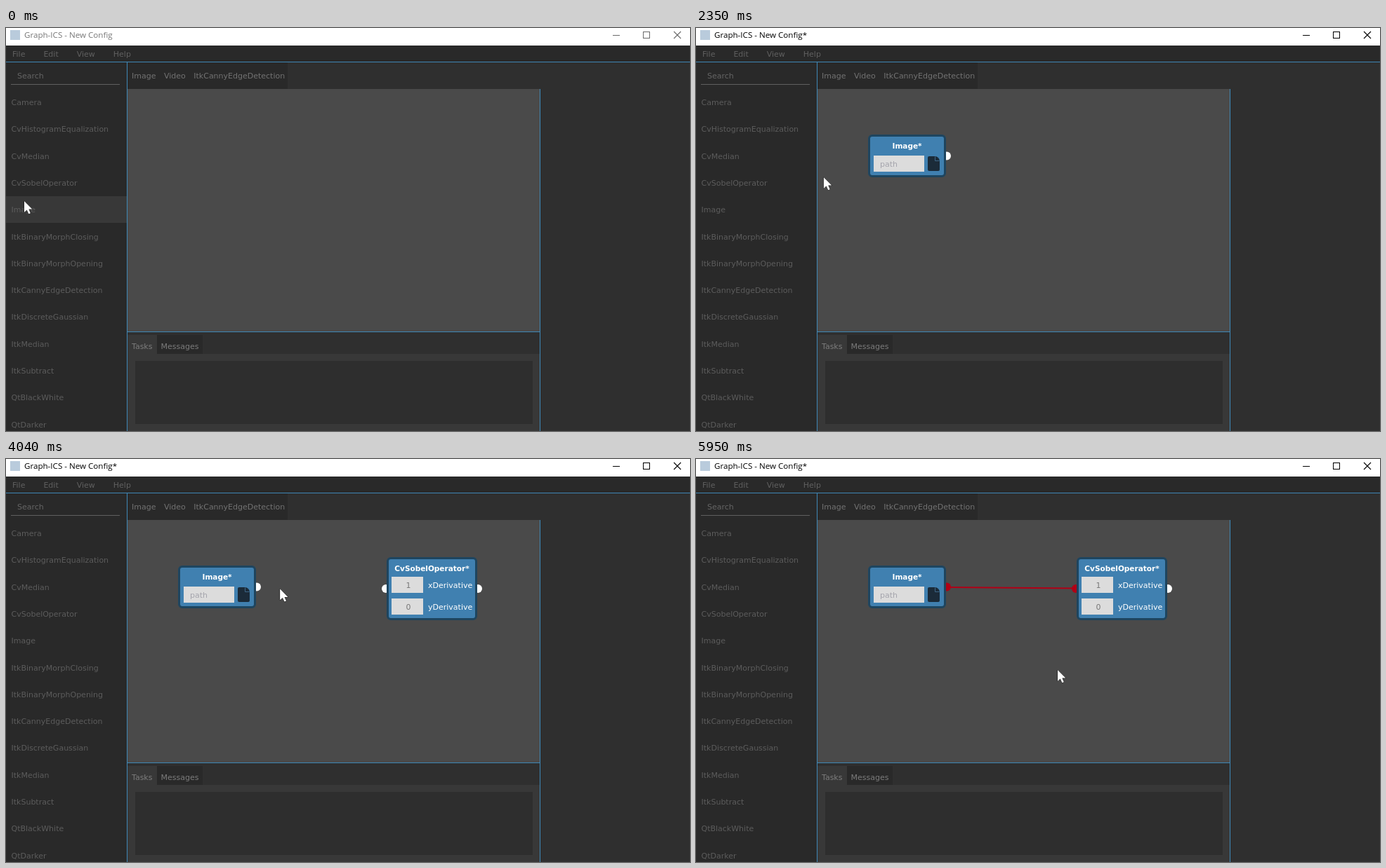
These frames come from a looping animation (974 px wide and 575 px high, 6.71 s). An HTML page with a canvas:

```html
<!DOCTYPE html>
<html lang="en">
<head>
<meta charset="utf-8">
<title>Node editor</title>
<style>
html, body { margin: 0; width: 974px; height: 575px; overflow: hidden; background: #2f2f2f; }
canvas { display: block; }
</style>
</head>
<body>
<canvas id="stage" width="974" height="575"></canvas>
<script>
const ctx = document.getElementById('stage').getContext('2d');
const LOOP = 6710, BLUE = '#3e87b6', RED = '#b00016';
const UI = '11px "DejaVu Sans", Verdana, sans-serif';
const BOLD = 'bold 10.5px "DejaVu Sans", Verdana, sans-serif';
const TITLE = '11.6px "Open Sans", "Noto Sans", sans-serif';
const FILTERS = ['Camera', 'CvHistogramEqualization', 'CvMedian', 'CvSobelOperator', 'Image',
  'ItkBinaryMorphClosing', 'ItkBinaryMorphOpening', 'ItkCannyEdgeDetection',
  'ItkDiscreteGaussian', 'ItkMedian', 'ItkSubtract', 'QtBlackWhite', 'QtDarker'];
const IMAGE_ROW = FILTERS.indexOf('Image'), SOBEL_ROW = FILTERS.indexOf('CvSobelOperator');

// Moments at which the user presses and releases the mouse
const IMAGE_DRAG = { from: 660, to: 1790 };
const SOBEL_DRAG = { from: 2690, to: 3510 };
const WIRE_DRAG = { from: 4480, to: 5250 };
const SNAP = 5130, NODE_LAG = 40;

// Pointer moves, each easing out; bow bends the way downwards
const START = { x: 26, y: 247 };
const MOVES = [
  { from: 50, to: 710, x: 161, y: 262, bow: 14 },
  { from: 840, to: 1530, x: 300, y: 183, bow: 0 },
  { from: 1970, to: 2630, x: 150, y: 221, bow: 0 },
  { from: 2730, to: 3390, x: 606, y: 185, bow: 12 },
  { from: 3510, to: 4300, x: 358, y: 184, bow: 3 },
  { from: 4500, to: SNAP, x: 527, y: 185, bow: 3 },
  { from: 5300, to: 5950, x: 515, y: 301, bow: 0 }
];

const during = (span, t) => t >= span.from && t < span.to;

function pointer(t) {
  let { x, y } = START;
  for (const m of MOVES) {
    if (t < m.from) break;
    const k = Math.sin(Math.min(1, (t - m.from) / (m.to - m.from)) * Math.PI / 2);
    x += (m.x - x) * k;
    y += (m.y - y) * k + m.bow * Math.sin(Math.PI * k);
  }
  return { x, y };
}

function rect(x, y, w, h, color) {
  ctx.fillStyle = color;
  ctx.fillRect(x, y, w, h);
}

function text(str, x, y, color, font = UI, align = 'left') {
  ctx.font = font;
  ctx.textAlign = align;
  ctx.fillStyle = color;
  ctx.fillText(str, x, y);
}

function labels(names, x, y, gap, color) {
  for (const name of names) {
    text(name, x, y, color);
    x += ctx.measureText(name).width + gap;
  }
}

function disc(x, y, r, color) {
  ctx.fillStyle = color;
  ctx.beginPath();
  ctx.arc(x, y, r, 0, 7);
  ctx.fill();
}

function line(points, color, width, close) {
  ctx.strokeStyle = color;
  ctx.lineWidth = width;
  ctx.beginPath();
  points.forEach(p => ctx.lineTo(...p));
  if (close) ctx.closePath();
  ctx.stroke();
}

function titleBar(t) {
  const active = t >= IMAGE_DRAG.from, ink = active ? '#000' : '#6a6a6a';
  const star = t >= IMAGE_DRAG.to ? '*' : '';
  rect(0, 0, 974, 25, '#fff');
  rect(6, 3, 14, 14, '#b9cbdc');
  text('Graph-ICS - New Config' + star, 26, 14, active ? '#000' : '#777', TITLE);
  rect(864, 10, 10, 1, ink);
  ctx.strokeStyle = ink;
  ctx.lineWidth = 1;
  ctx.strokeRect(907.5, 5.5, 9, 9);
  line([[951, 5], [961, 15]], ink, 1.1);
  line([[961, 5], [951, 15]], ink, 1.1);
}

// The row a drag starts from is hovered, then pressed until the pointer leaves the list
function rowState(row, t) {
  const inside = pointer(t).x <= 172;
  const [drag, hover] = row === IMAGE_ROW ? [IMAGE_DRAG, 0] : [SOBEL_DRAG, 2400];
  if ((row !== IMAGE_ROW && row !== SOBEL_ROW) || !inside || t < hover || t >= drag.to) return 'idle';
  return t < drag.from ? 'hover' : 'pressed';
}

function filterList(t) {
  rect(0, 49, 172, 526, '#292929');
  text('Search', 16, 72, '#656565');
  rect(7, 80, 155, 1, '#606060');
  FILTERS.forEach((name, i) => {
    const y = 87 + i * 38.3, state = rowState(i, t);
    if (state !== 'idle') rect(0, Math.round(y), 172, 38, state === 'hover' ? '#383838' : '#4d4d4d');
    text(name, 7.5, Math.round(y + 23), state === 'pressed' ? '#999' : '#5c5c5c');
  });
}

function panels(t) {
  rect(0, 25, 974, 550, '#2f2f2f');
  rect(0, 25, 974, 23, '#292929');
  labels(['File', 'Edit', 'View', 'Help'], 9, 41, 26, '#606060');
  filterList(t);

  rect(173, 49, 228, 38, '#292929');
  labels(['Image', 'Video', 'ItkCannyEdgeDetection'], 179, 72, 11.5, '#727272');
  rect(173, 87, 588, 346, '#4a4a4a');

  rect(173, 465, 588, 110, '#383838');
  rect(173, 438, 42, 27, '#383838');
  rect(215, 438, 65, 27, '#292929');
  labels(['Tasks', 'Messages'], 179, 457.5, 12, '#7c7c7c');
  rect(184, 475, 566, 90, '#2e2e2e');

  rect(0, 48, 974, 1, BLUE);
  rect(172, 48, 1, 527, BLUE);
  rect(173, 433, 588, 1, BLUE);
  rect(760, 87, 1, 488, BLUE);
}

// Draws a node around its centre
function node(c, scale, w, h, title, ports, body) {
  ctx.save();
  ctx.translate(c.x, c.y);
  ctx.scale(scale, scale);
  ports.forEach(([side, color]) => disc(side * (w / 2 + 1), 0, 6, color));
  ctx.beginPath();
  ctx.roundRect(1.5 - w / 2, 1.5 - h / 2, w - 3, h - 3, 4.5);
  ctx.fillStyle = '#4080b0';
  ctx.fill();
  ctx.strokeStyle = '#1e455f';
  ctx.lineWidth = 3;
  ctx.stroke();
  text(title, 0, 19.5 - h / 2, '#fff', BOLD, 'center');
  body();
  ctx.restore();
}

function imageNode(c, scale, port) {
  node(c, scale, 111, 61, 'Image*', [[1, port]], () => {
    rect(-47.5, -.5, 72, 23, '#dcdcdc');
    text('path', -38.5, 15, '#a4a4ac');
    ctx.fillStyle = '#1b2b39';
    ctx.beginPath();
    ctx.roundRect(29.5, .5, 17, 21, [2, 7, 2, 2]);
    ctx.fill();
    line([[40, 1], [40, 7], [46, 7]], '#3c6586', 1);
  });
}

function sobelNode(c, scale, port) {
  node(c, scale, 129, 90, 'CvSobelOperator*', [[-1, port], [1, '#fff']], () => {
    [['1', 'x', -17], ['0', 'y', 14]].forEach(([value, axis, y]) => {
      rect(-57.5, y, 45, 23, '#dcdcdc');
      text(value, -33.5, y + 16, '#777', UI, 'center');
      text(axis + 'Derivative', -5.5, y + 16, '#fff');
    });
  });
}

// A node follows the pointer at half size until it is dropped
function place(draw, home, drag, port, t) {
  if (t >= drag.to) draw(home, 1, port);
  else if (t >= drag.from && pointer(t).x > 172) draw(pointer(t - NODE_LAG), .5, port);
}

function graph(t) {
  const wiring = t >= WIRE_DRAG.from, wired = t >= SNAP, tip = pointer(t);
  ctx.save();
  ctx.beginPath();
  ctx.rect(173, 87, 587, 346);
  ctx.clip();
  place(imageNode, { x: 300.5, y: 182.5 }, IMAGE_DRAG, wiring ? RED : '#fff', t);
  place(sobelNode, { x: 606.5, y: 185 }, SOBEL_DRAG, wired ? RED : '#fff', t);
  if (wiring) line([[358, 183], wired ? [540, 184.5] : [tip.x, tip.y]], RED, 2);
  ctx.restore();
}

function cursor(t) {
  const { x, y } = pointer(t);
  ctx.save();
  ctx.translate(x, y);
  line([[0, 0], [0, 16], [3.7, 12.6], [6.3, 18.3], [8.9, 17.2], [6.4, 11.6], [11.4, 11.6]], '#111', 1, true);
  ctx.fillStyle = '#fff';
  ctx.fill();
  if ([IMAGE_DRAG, SOBEL_DRAG, WIRE_DRAG].some(d => during(d, t))) disc(0, 0, 11.7, 'rgba(255,250,0,.5)');
  ctx.restore();
}

function frame() {
  const t = performance.now() % LOOP;
  titleBar(t);
  panels(t);
  graph(t);
  cursor(t);
  requestAnimationFrame(frame);
}
requestAnimationFrame(frame);
</script>
</body>
</html>
```
